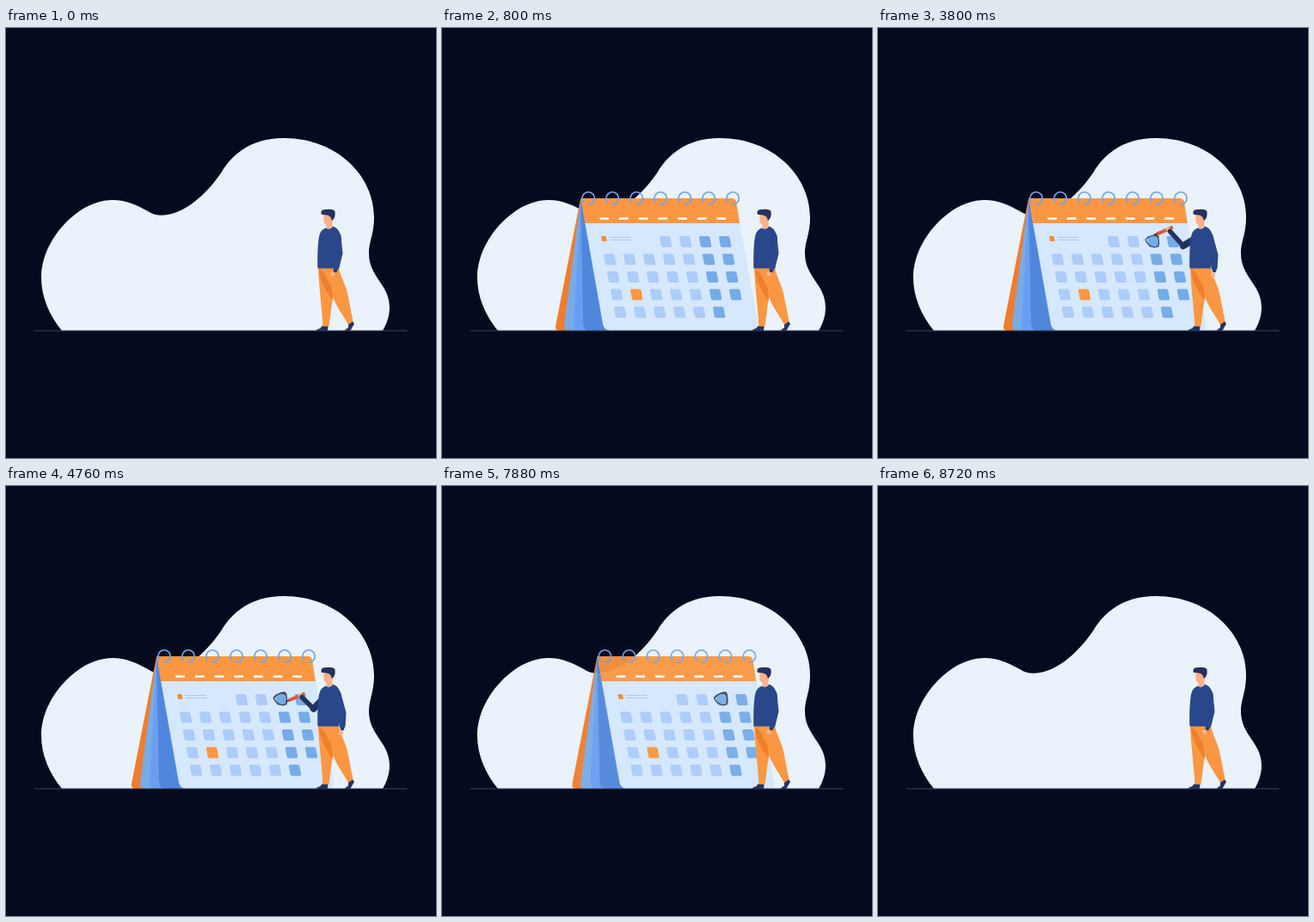
Animation of 500 by 500 pixels, one loop 9.8 s. Source, as an HTML page:

```html
<!DOCTYPE html>
<html lang="en">
<head>
<meta charset="utf-8">
<title>Marking the calendar</title>
<style>
  html, body { margin: 0; width: 100%; height: 100%; overflow: hidden; background: #050b1f; }
  svg { display: block; width: 100vw; height: 100vh; }
  .limb { fill: none; stroke-linecap: round; stroke-linejoin: round; }
</style>
</head>
<body>
<svg viewBox="0 0 500 500">
  <path fill="#eaf2fb" d="M65 352C50 334 41 312 41 290C41 262 58 234 80 217C96 204 112 200 124 200C140 200 152 206 165 213C174 219 184 219 196 215C217 208 237 188 251 167C262 149 283 128 323 128C385 128 428 172 428 220C428 240 422 248 422 262C422 290 446 298 446 325C446 336 442 345 438 352Z"/>

  <g id="calendar">
    <path fill="#ef7d2e" d="M175 198L146 346Q145 352 151 352H180L181 215Z"/>
    <path fill="#77abe8" d="M175 201L156 344Q155 352 162 352H190L181 220Z"/>
    <path fill="#699ef0" d="M175 201L167 344Q167 352 173 352H195L181 220Z"/>
    <path fill="#5087dc" d="M175 199L178 344Q179 352 185 352H209L183 227Z"/>
    <path fill="#d6e8fe" d="M180 226H360L381 344Q382 352 376 352H209Q203 352 201 345Z"/>
    <path fill="#fb9743" d="M175 198H351Q355 198 356 202L360 227H180Z"/>
    <g id="rings" fill="none" stroke="#6ea6ee" stroke-width="1.7" stroke-linecap="round"></g>
    <g id="dashes" fill="#fff"></g>
    <rect x="-2.8" y="-3" width="5.6" height="6" rx="1" fill="#f58a38" transform="translate(202.3 245) skewX(10.5)"/>
    <path d="M208 243.5H233M209 246.5H234" stroke="#a9c8f8"/>
    <g id="cells"></g>
    <path id="mark" pathLength="1" class="limb" stroke="#35414f" stroke-width="1.2" stroke-dasharray="1 2"
      d="M325 243C323 239 314 242 311 246C312 250 316 254 321 255C326 255 327 252 326.5 248C326 242 326 240 323 239.8C318 240 313 244 311.5 247C313 252 317 253.5 320 254.5C325 255.5 326.5 253 326 249C326 245 326 242 324.5 240"/>
  </g>

  <path d="M33 352H466.500" stroke="#39445a"/>

  <g id="farArm">
    <path id="pencil" class="limb" stroke="#dc5844" stroke-width="4" style="stroke-linecap:butt"/>
    <path id="tip" class="limb" stroke="#3a3444" stroke-width="1.8"/>
    <circle id="farHand" r="2.600" fill="#fdb18a"/>
    <path id="farUpper" class="limb" stroke="#22335f" stroke-width="8"/>
    <path id="farFore" class="limb" stroke="#22335f" stroke-width="5.500"/>
  </g>

  <path fill="#263460" d="M368 346L374.500 347L374 352H361Q361 350 365 349.500Z"/>
  <path fill="#263460" d="M398 344L403 341L405 344Q402 349 400.500 352H394Q394 350.500 398 348.500Z"/>
  <path fill="#fb9743" d="M363 278H387C389 291 396 299 398 313L403.500 341L398 345C392 334 385 325 380 313L375.500 347H368.500C367 322 364 302 363 278Z"/>
  <path fill="#f07f2b" d="M364 280L370 285L379 303L380 318C373 306 365 297 364 280Z"/>
  <path fill="#fdb18a" d="M369.500 217H380L379.500 231Q376 235 372.500 232L372 228Q369.500 228 369.300 224Z"/>
  <path fill="#24315c" d="M366.500 214Q367 210.500 373 211Q380 210 382.500 213Q383.500 221 379 224L377.500 220Q375.500 217 367.500 217Q366 216 366.500 214Z"/>
  <path fill="#2b478b" d="M371.500 232.500Q377 235.500 380.500 230.500Q388.500 234 390 245L390 266L387 279.500H362.500C362 265 362.500 244 365.500 238Q368 234 371.500 232.500Z"/>
  <circle id="nearHand" r="2.700" fill="#fdb18a"/>
  <path id="nearCuff" class="limb" stroke="#24396f" stroke-width="4.600"/>
  <path id="nearSleeve" class="limb" stroke="#2b478b" stroke-width="7"/>
</svg>

<script>
const LOOP = 9800;
const $ = id => document.getElementById(id);
const span = (t, from, to) => Math.min(1, Math.max(0, (t - from) / (to - from)));
const easeOut = p => 1 - (1 - p) ** 2;
const easeInOut = p => (1 - Math.cos(Math.PI * p)) / 2;
const mix = (a, b, k) => a + (b - a) * k;
const mixPoint = (a, b, k) => [mix(a[0], b[0], k), mix(a[1], b[1], k)];
const polar = ([x, y], length, degrees) => {
  const a = degrees * Math.PI / 180;
  return [x + length * Math.cos(a), y + length * Math.sin(a)];
};
const join = (id, ...points) => $(id).setAttribute('d', 'M' + points.join('L'));
const place = (id, [x, y]) => $(id).setAttribute('transform', `translate(${x} ${y})`);

function buildCalendar() {
  let rings = '', dashes = '', cells = '';
  for (let i = 0; i < 7; i++) {
    rings += `<path d="M${184 + 28 * i} 205.200a7.200 7.200 0 1 0-5.600-2.700"/>`;
    dashes += `<rect x="${197 + 22.7 * i}" y="220.200" width="11" height="2.500" rx="1"/>`;
  }
  for (let row = 0; row < 5; row++) {
    const first = row === 0 ? 3 : 0, last = row === 4 ? 5 : 6;
    for (let col = first; col <= last; col++) {
      const fill = row === 3 && col === 1 ? '#fb9743' : col > 4 ? '#77abe8' : '#adccfa';
      cells += `<rect x="-6.300" y="-6.500" width="12.600" height="13" rx="2" fill="${fill}"
        transform="translate(${205 + 23 * col + 4 * row} ${248.5 + 20.5 * row}) skewX(10.5)"/>`;
    }
  }
  // The opening row sits level with the second one's columns.
  $('rings').innerHTML = rings;
  $('dashes').innerHTML = dashes;
  $('cells').innerHTML = cells;
}

function drawArms(raise, reach) {
  const shoulder = [374, 242];
  let elbow = polar(shoulder, 21.4, mix(95, 142.6, raise));
  let hand = polar(elbow, 24, mix(85, 228.4, raise));
  elbow = [elbow[0] + reach[0] * 0.6, elbow[1] + reach[1] * 0.6];
  hand = [hand[0] + reach[0], hand[1] + reach[1]];
  const aim = mix(95, 157, raise);
  join('pencil', polar(hand, -6, aim), polar(hand, 15, aim));
  join('tip', polar(hand, 15, aim), polar(hand, 17, aim));
  join('farUpper', shoulder, elbow);
  join('farFore', elbow, mixPoint(elbow, hand, 0.88));
  place('farHand', hand);

  const nearElbow = mixPoint([388, 262], [392, 264], raise);
  const wrist = mixPoint([383, 282], [391, 282], raise);
  join('nearSleeve', [386, 242], nearElbow, mixPoint(nearElbow, wrist, 0.8));
  join('nearCuff', nearElbow, wrist);
  place('nearHand', mixPoint([380, 286], [389.5, 287], raise));
}

function draw(t) {
  const leave = span(t, 7840, 8720);
  const x = -90 * (1 - easeOut(span(t, 120, 1240))) + 60 * easeOut(leave);
  place('calendar', [x, 0]);
  $('calendar').setAttribute('opacity', span(t, 120, 520) * (1 - leave));

  const drawn = span(t, 2320, 5040);
  const mark = $('mark');
  mark.setAttribute('stroke-dashoffset', 1 - drawn);
  mark.setAttribute('visibility', drawn ? 'visible' : 'hidden');
  const pen = mark.getPointAtLength(drawn * mark.getTotalLength());
  const raise = easeInOut(span(t, 1160, 1880)) * (1 - easeInOut(span(t, 5040, 5800)));
  drawArms(raise, [(pen.x - 325) * raise, (pen.y - 243) * raise]);
}

buildCalendar();
const start = performance.now();
(function tick() {
  draw((performance.now() - start) % LOOP);
  requestAnimationFrame(tick);
})();
</script>
</body>
</html>
```
